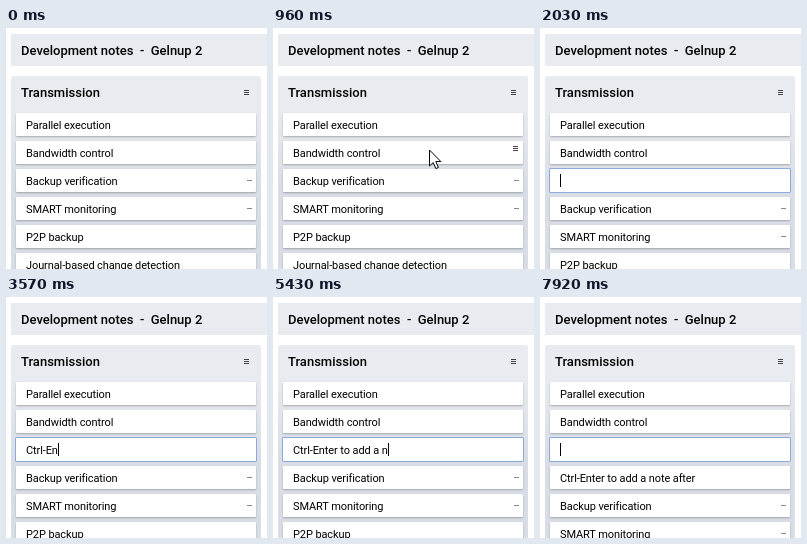
An HTML page for the animation above (8000 ms loop, 261 by 241 pixels).

```html
<!DOCTYPE html>
<html lang="en">
<head>
<meta charset="utf-8">
<title>Development notes</title>
<style>
  html, body { margin: 0; width: 100%; height: 100%; overflow: hidden; background: #fff; }
  body { position: relative; font-family: Roboto, Inter, sans-serif; color: #000; }
  div, svg, i { position: absolute; box-sizing: border-box; white-space: pre; }
  .head { left: 5px; padding-left: 10px; background: #e8ecf0; font-size: 13px; font-weight: 500; line-height: 33px; }
  #title { top: 6px; width: 256px; height: 32px; }
  #panel {
    top: 48px; width: 250px; height: 200px; border-radius: 2px;
    background: linear-gradient(#e8ecf0 32px, #d9dee6 110px);
  }
  .card {
    left: 10px; width: 240px; height: 23px; padding-left: 10px; border-radius: 1px;
    background: #fff; box-shadow: 0 1px 2px #0004;
    font-size: 11px; line-height: 26px; letter-spacing: -.1px;
  }
  .card.edit {
    left: 9px; width: 242px; height: 25px; border: 1px solid #8ea9dc;
    box-shadow: none;
  }
  .caret { display: inline-block; position: relative; width: 1px; height: 13px; margin-right: -1px; background: #000; vertical-align: -2px; }
  .dash { left: 231px; top: 11px; width: 5px; height: 1px; background: #888; }
  .menu { width: 5px; height: 5px; background: repeating-linear-gradient(#444 0 1px, #0000 1px 2px); }
</style>
</head>
<body>
<div id="title" class="head">Development notes  -  Gelnup 2</div>
<div id="panel" class="head">Transmission</div>
<i class="menu" style="left:238px;top:62px"></i>
<div id="list"></div>
<i class="menu" id="hover" style="left:240px;top:118px"></i>
<svg id="pointer" width="14" height="21" viewBox="-1 -1 14 21">
  <path d="M.5 0V16L4.2 12.6L6.9 18.6L9.4 17.5L6.8 11.6H11.9Z" fill="#fff" stroke="#000"/>
</svg>
<script>
const LOOP = 8000, EDIT = 990, INSERT = 2030, AGAIN = 7920;
const notes = ['Parallel execution', 'Bandwidth control', 'Backup verification',
  'SMART monitoring', 'P2P backup', 'Journal-based change detection'];
const dashed = [notes[2], notes[3]];
const typed = 'Ctrl-Enter to add a note after';
const keyTimes = [2430, 2540, 2650, 2850, 3110,
  3440, 3570, 3630, 3730, 3830, 3930, 4040, 4140,
  4270, 4420, 4600, 4730, 4890, 5040, 5170, 5430, 5490, 5690,
  5890, 6020, 6150, 6310, 6470, 6670, 6790];

const get = id => document.getElementById(id);
const clamp = v => Math.max(0, Math.min(1, v));
const within = (t, a, b) => t >= a && t < b;

const cards = notes.map(() => {
  const card = document.createElement('div');
  get('list').append(card);
  return card;
});

function drawCards(t) {
  const rows = [...notes];
  let active = -1;
  if (t >= EDIT) active = 1;
  if (t >= INSERT) {
    active = 2;
    rows.splice(2, 0, typed.slice(0, keyTimes.filter(k => k <= t).length));
  }
  if (t >= AGAIN) rows.splice(2, 0, '');
  const caretOn = !within(t, 1570, INSERT) && !within(t, 7190, 7720);

  cards.forEach((card, i) => {
    const edit = i === active;
    const extra = edit && caretOn ? '<i class="caret"></i>'
      : dashed.includes(rows[i]) ? '<i class="dash"></i>' : '';
    const html = rows[i] + extra;
    card.className = edit ? 'card edit' : 'card';
    card.style.top = 85 + 28 * i - edit + 'px';
    if (card.shown !== html) card.innerHTML = card.shown = html;
  });
}

function drawPointer(t) {
  const step = Math.floor((t - 160) / 30) * 30;
  const left = (1 - clamp(step / 570)) ** 3;
  const pointer = get('pointer');
  pointer.style.left = Math.round(155 + 107 * left) + 'px';
  pointer.style.top = Math.round(121 + 36 * left) + 'px';
  pointer.style.display = within(t, 190, EDIT) ? '' : 'none';
  get('hover').style.opacity = t < EDIT ? clamp((t - 365) / 150) : clamp((1110 - t) / 150);
}

function draw() {
  const t = performance.now() % LOOP;
  drawCards(t);
  drawPointer(t);
  requestAnimationFrame(draw);
}
draw();
</script>
</body>
</html>
```
